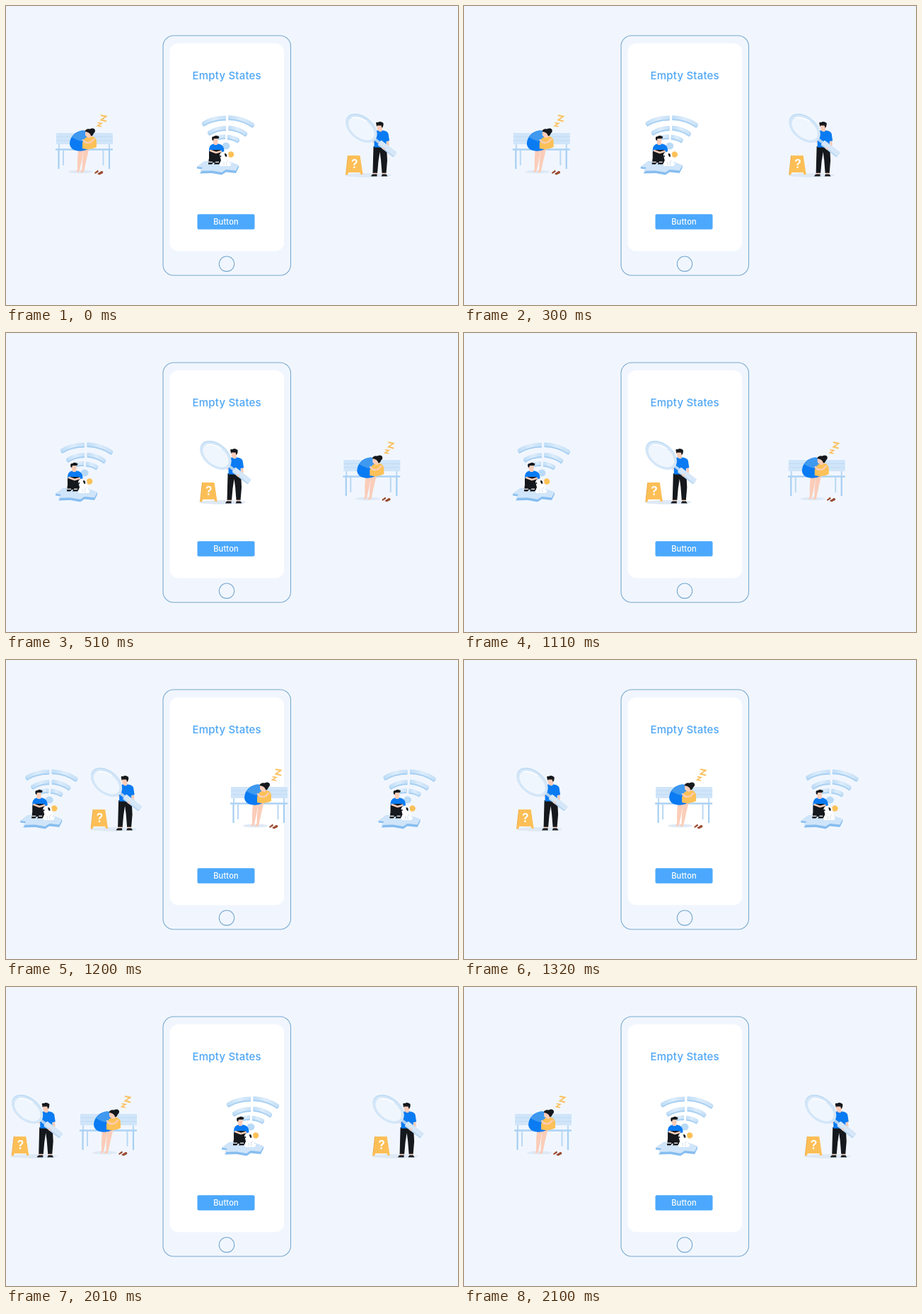
Animation of 639x424 px, one loop 2.13 s. Source, as an HTML page:

```html
<!DOCTYPE html>
<html lang="en">
<head>
<meta charset="utf-8">
<title>Empty States</title>
<style>
  html, body { margin: 0; width: 100%; height: 100%; overflow: hidden; background: #f1f6fe; }
  svg { display: block; width: 100%; height: 100%; }
  text { font-family: Inter, Roboto, sans-serif; text-anchor: middle; }
  .line { fill: none; stroke: #78a9cf; stroke-width: 1.1; }
  .ink { fill: #15181c; }
  .skin { fill: #fbcdb9; }
  .blue { fill: #0a7bf2; }
  .gold { fill: #fcc158; }
  .pale { fill: #d0e5f9; }
  .shade { fill: #dfe9f6; }
  .limb { fill: none; stroke: #fbcdb9; stroke-linecap: round; stroke-linejoin: round; }
  .zed { fill: none; stroke: #fbc060; stroke-linejoin: miter; }
</style>
</head>
<body>
<svg viewBox="0 0 639 424">
  <defs>
    <linearGradient id="band">
      <stop offset="0" stop-color="#bfddf7"/>
      <stop offset=".5" stop-color="#dcecfb"/>
      <stop offset="1" stop-color="#c6e0f7"/>
    </linearGradient>
    <g id="arcs" fill="none" stroke-width="4.800">
      <path d="M278 167Q291 158 311 158"/>
      <path d="M314.500 157.500Q335 158 350 169"/>
      <path d="M286 180Q297 172.500 311 172.500"/>
      <path d="M314.500 172Q329 173 340 181.500"/>
      <path d="M298 186Q304 184.500 310 184.500"/>
      <path d="M313 185Q323 186 329 190.500"/>
    </g>

    <g id="wifi">
      <use href="#arcs" y="2" stroke="#a6cff2"/>
      <use href="#arcs" stroke="url(#band)"/>
      <ellipse cx="311" cy="198.500" rx="5.500" ry="5" fill="#b9daf7"/>
      <path fill="#86bdf0" d="M270 228L281 220L291 221L302 218L314 220L329 226V229L325 237L311 235.500L305 239.500L291 237L274 237.500L278 231.500L270 230.500Z"/>
      <path class="pale" d="M270 228L281 220L291 221L302 218L314 220L329 226L325 233.500L311 232L305 236L291 233.500L274 234L278 229Z"/>
      <path class="blue" d="M287 206Q286.500 197 293 195.500H301Q308.500 197 308.500 206L303 209H290Z"/>
      <path class="skin" d="M292.500 187H299.500V192Q299 195 298.500 197H294.500Q292.500 194 292.500 190Z"/>
      <path class="ink" d="M291.500 190Q290 184.500 294 185Q297 182.500 301.500 185.500Q301 188.500 299 188H294L292.800 191Z"/>
      <path class="ink" d="M287 207Q288 204 292 204H302Q306 205 306 211L304 222H288Q285.500 221 287 216Z"/>
      <path class="limb" stroke-width="2.500" d="M289 205L297 208L304 206"/>
      <path d="M287 221.500H292M296 221.500H301" stroke="#fff" stroke-width="1.500"/>
      <path class="ink" d="M286 222H293L291 224.500H286ZM295 222H303L301 224.500H294Z"/>
      <circle class="gold" cx="318" cy="210.500" r="4.300"/>
      <path fill="#fff" d="M302 211Q304 206 308 207L312 208Q316 210 314 214Q317 217 316 223L319 221L317 227H303Q301 224 304 219L303 215Z"/>
      <circle class="ink" cx="303.300" cy="213" r="1"/>
      <path class="ink" d="M309 209Q313 209 312 214Q309 214 309 209Z"/>
      <path d="M308 226V221M312 226Q310 220 314 219" fill="none" stroke="#c9d8e8" stroke-width=".8"/>
    </g>

    <g id="search">
      <ellipse class="shade" cx="306" cy="240" rx="33" ry="3"/>
      <path fill="#e9a84a" d="M277 212H281L277 239H274Z"/>
      <path fill="#fcbf57" d="M278 212H294.500L298.500 239H295.500L294.500 236H278L277 239.500H274.500Z"/>
      <text x="286.800" y="230" font-size="17.500" font-weight="600" fill="#fff">?</text>
      <path class="ink" d="M313.500 199H332L333 219L331.500 237H325.500L324 218L322.500 207L320.500 220L319 237H312.500L313 217Z"/>
      <path d="M313 237.500H318.500M326 237.500H331" stroke="#fbcdb9" stroke-width="1.500"/>
      <path class="ink" d="M312.500 238.500H318.500V241.500H310Q310.500 239.500 312.500 238.500ZM326 238.500H331.500L333.500 241.500H324.500Z"/>
      <path class="limb" stroke-width="3.400" d="M333.500 189L334 197L329 202M316.500 187L313 192"/>
      <path class="blue" d="M314.500 180Q315.500 177 319 176.500H327Q333 177 334.500 181L336 191L331.500 192L332 200.500H314.500V191L312.500 188Z"/>
      <path class="skin" d="M318.500 168H326V175L325 178Q322 179 320.500 177L318.500 174Z"/>
      <path class="ink" d="M317.500 168Q316 164 320 165Q323 162.500 327.500 166Q328 171 325.500 173L324.500 169.500H319L318 171Z"/>
      <g transform="translate(296.500 174) rotate(38)">
        <path d="M24 0H34" stroke="#aecfed" stroke-width="4"/>
        <ellipse cx="-1" cy="-1" rx="25" ry="16" fill="#bbd9f3"/>
        <ellipse rx="25" ry="16" fill="#d3e6f8"/>
        <ellipse rx="21" ry="12.600" fill="#f0f6fd"/>
        <path d="M-20 -4Q-14 -12 0 -12.600" fill="none" stroke="#fff" stroke-width="1.500"/>
        <rect x="32" y="-4.300" width="28.500" height="8.600" rx="1.500" fill="#b8d6f1"/>
        <rect x="32" y="-4.300" width="28.500" height="6.800" rx="1.500" fill="#d5e7f8"/>
      </g>
      <circle class="skin" cx="328" cy="202" r="1.800"/>
    </g>

    <g id="bench">
      <ellipse class="shade" cx="305.500" cy="235" rx="17.500" ry="2.500"/>
      <path d="M275 196V203M346 196V203M281 205V226M337.500 205V226" stroke="#b9d8f4" stroke-width="2"/>
      <path d="M274.500 204V231M346 204V231" stroke="#a6cff3" stroke-width="2.200"/>
      <path class="pale" d="M271 180H351V196H271Z"/>
      <path d="M271 185.300H351M271 190.700H351" stroke="#bcdaf4" stroke-width=".8"/>
      <path d="M270 203.500H351" stroke="#abd2f4" stroke-width="2.600"/>
      <path class="skin" d="M302 202H310L307 219L304 233L303 235.500H299L301 232L301 218ZM310 202H317.500L313.500 219L310.500 233L309.500 236H304.500L307.500 232L308 218Z"/>
      <path class="blue" d="M290 196Q290 187 297 181Q305 175 313 177Q319 180 318 190L316 203Q308 207 299 205Q291 203 290 196Z"/>
      <path fill="#3f99ef" d="M293 186Q299 178 308 176.500Q314 176.500 315 181Q313 188 308 192Q301 191 293 186Z"/>
      <path class="gold" d="M308 194Q311 185 318 184.500Q327 184 328 192V200Q319 205 308 202Z"/>
      <path class="skin" d="M312 178H321Q323 184 319 187Q314 187 312 183Z"/>
      <path class="limb" stroke-width="2.400" d="M309 190Q313 196 320 193L324 189"/>
      <path class="ink" d="M311.500 178Q313 173.500 318.500 174.500Q323 172.500 325.500 175Q327 178 324 180.500Q322.500 185 320 184Q319 179 311.500 178Z"/>
      <path fill="#9b4a31" d="M325 236.500L330 232.500L331 235L326 238ZM329 238L335 234Q338 234 337 237L332 239.500Z"/>
      <path class="zed" stroke-width="1.900" d="M334 155L341.500 156.500L334.500 161.500L342 163.500"/>
      <path class="zed" stroke-width="1.600" d="M329.500 165.500L335 166.500L329.500 169.800L335 171"/>
    </g>
  </defs>

  <rect width="639" height="424" fill="#f1f6fe"/>
  <rect class="line" x="222" y="42" width="180.500" height="340" rx="15"/>
  <rect x="231.500" y="53" width="161.500" height="294.500" rx="12" fill="#fff"/>
  <circle class="line" cx="312" cy="365.700" r="10.700"/>
  <text x="312.200" y="104" font-size="15" font-weight="500" letter-spacing=".2" fill="#4ea6f4">Empty States</text>
  <rect x="270.500" y="295.300" width="81" height="21.400" rx="2" fill="#4ba8fc"/>
  <text x="311" y="310" font-size="11.100" font-weight="500" letter-spacing=".15" fill="#fff">Button</text>
  <use class="slot"/><use class="slot"/><use class="slot"/><use class="slot"/>
</svg>
<script>
const LOOP = 2130, STEP = 30, SLIDE = 240;
const LEFT = -200, RIGHT = 206, ENTER = 192, EXIT = 315;
const LAG = .03; // the entering scene trails the others
const scenes = ['wifi', 'search', 'bench'];
// lead: how far a slide has already run at its first visible step
const moves = [{ at: 300, lead: 25 }, { at: 1110, lead: 23 }, { at: 1920, lead: 37 }];
const slots = document.querySelectorAll('.slot');

// cubic-bezier(.25, .1, .25, 1)
function ease(x) {
  const curve = (u, a, b) => 3 * (1 - u) ** 2 * u * a + 3 * (1 - u) * u * u * b + u ** 3;
  let lo = 0, hi = 1;
  for (let i = 0; i < 24; i++) {
    const mid = (lo + hi) / 2;
    if (curve(mid, .25, .25) < x) lo = mid; else hi = mid;
  }
  return curve(hi, .1, 1);
}

function place(slot, scene, x) {
  slot.setAttribute('href', '#' + scenes[scene % 3]);
  slot.setAttribute('x', x.toFixed(2));
}

function draw(now) {
  const t = Math.floor(now % LOOP / STEP) * STEP;
  let k = 2, p = 2;
  moves.forEach((m, i) => {
    if (t >= m.at) {
      k = i;
      p = (t - m.at + m.lead) / SLIDE;
    }
  });
  const rest = 1 - ease(Math.min(1, p));
  const wait = 1 - ease(Math.min(1, p - LAG));
  place(slots[0], k + 2, LEFT - EXIT * p ** 2.45);
  place(slots[1], k, LEFT * (1 - rest));
  place(slots[2], k + 1, RIGHT * rest);
  place(slots[3], k + 2, RIGHT + ENTER * wait);
}

const start = performance.now();
function tick() {
  draw(performance.now() - start);
  requestAnimationFrame(tick);
}
tick();
</script>
</body>
</html>
```
